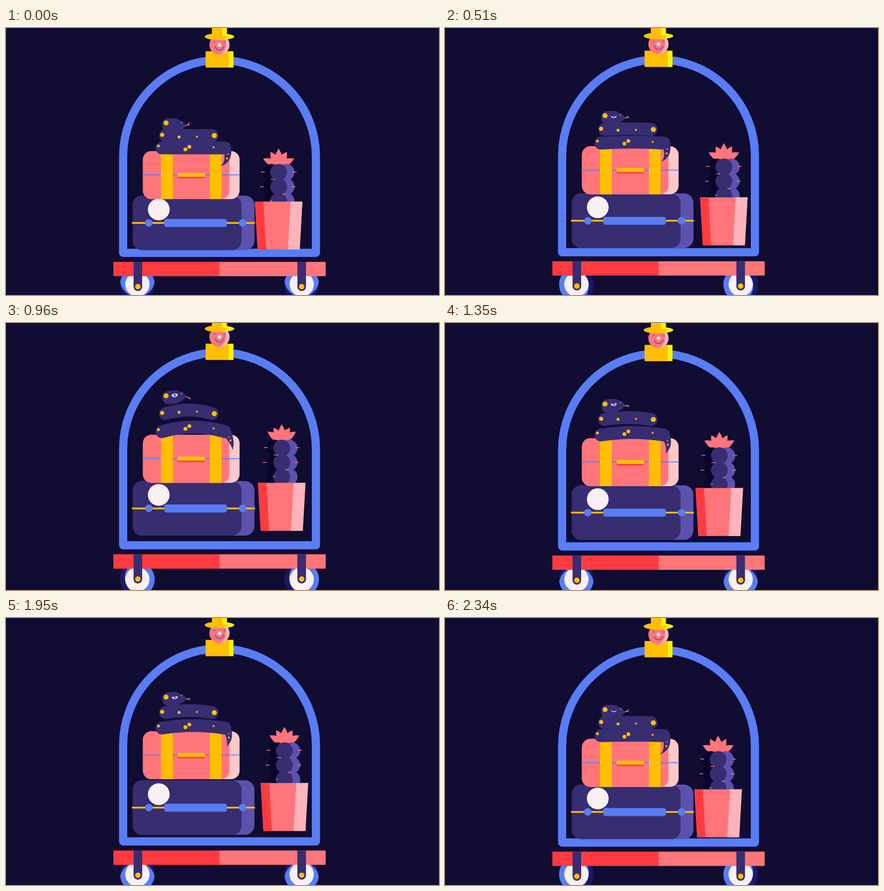
Animation, 875 px wide and 540 px high, one loop 2370 ms. Source, as an HTML page with a canvas:

```html
<!DOCTYPE html>
<html lang="en">
<head>
<meta charset="utf-8">
<title>Luggage cart</title>
<style>
html, body { margin: 0; width: 100%; height: 100%; overflow: hidden; background: #110c32; }
canvas { display: block; }
</style>
</head>
<body>
<canvas id="stage" width="875" height="540"></canvas>
<script>
const ctx = document.getElementById('stage').getContext('2d');
const LOOP = 2370, STEP = 30, BEAT = 600;
const BG = '#110c32', BLUE = '#587df5', NAVY = '#1b1866', INDIGO = '#372d70', VIOLET = '#5c52ae',
  SHADE = '#08062b', RED = '#ff3b40', PINK = '#ff757a', BLUSH = '#ffb4bb', PALE = '#ffc8c9',
  ORANGE = '#ffbf00', YELLOW = '#fff200', WHITE = '#f8f0f3';

const fill = (color, d) => { ctx.fillStyle = color; ctx.fill(new Path2D(d)); };
const line = (color, width, d) => {
  ctx.strokeStyle = color;
  ctx.lineWidth = width;
  ctx.stroke(new Path2D(d));
};
const box = (color, x1, y1, x2, y2, r = 0) => {
  ctx.fillStyle = color;
  ctx.beginPath();
  ctx.roundRect(x1, y1, x2 - x1, y2 - y1, r);
  ctx.fill();
};
const oval = (color, x, y, rx, ry = rx) => {
  ctx.fillStyle = color;
  ctx.beginPath();
  ctx.ellipse(x, y, rx, ry, 0, 0, Math.PI * 2);
  ctx.fill();
};
const group = (x, y, draw) => { ctx.save(); ctx.translate(x, y); draw(); ctx.restore(); };
const clipTo = d => ctx.clip(new Path2D(d));
const turn = (x, y, angle) => {
  ctx.translate(x, y);
  ctx.rotate(angle);
  ctx.translate(-x, -y);
};
const disc = (x, y, r) => `M${x - r} ${y}a${r} ${r} 0 1 1 ${2 * r} 0a${r} ${r} 0 1 1 ${-2 * r} 0`;

// Extra lift of the small case above the large one: [time, pixels]
const HOPS = [[0, 0], [510, 5.3], [960, 3.5], [1350, 5.4], [1590, 9.2], [1950, 9.2], [2340, 2.4], [2400, 0]];
function hop(t) {
  const i = HOPS.findIndex(([time]) => time > t);
  const at = k => HOPS[Math.min(HOPS.length - 1, Math.max(0, k))];
  const slope = k => (at(k + 1)[1] - at(k - 1)[1]) / (at(k + 1)[0] - at(k - 1)[0]);
  const [t0, a] = at(i - 1), [t1, b] = at(i), w = t1 - t0, u = (t - t0) / w, v = 1 - u;
  return a * v * v * (1 + 2 * u) + b * u * u * (3 - 2 * u)
    + w * u * v * (v * slope(i - 1) - u * slope(i));
}

function wheel(x, t) {
  const y = 518.5, a = Math.PI / 2 + t / 300 * Math.PI * 2;
  oval(NAVY, x, y, 35);
  ctx.save();
  clipTo(disc(x, y, 35));
  oval(BLUE, x - 10 * Math.cos(a), y - 10 * Math.sin(a), 35);
  ctx.restore();
  oval(WHITE, x, y, 24.5);
}

function clown() {
  oval(BLUSH, 431.5, 34, 20.3);
  ctx.save();
  clipTo(disc(431.5, 34, 20.3));
  oval(PINK, 419, 32, 26);
  ctx.restore();
  oval(BLUE, 421.5, 28.5, 2);
  oval(BLUE, 441.5, 28.5, 2);
  line('#5a4fa5', 1.6, 'M423 37C424 47.5 439 47.5 440 37');
  oval(WHITE, 431.5, 34, 3.6);
  oval(YELLOW, 431.5, 17.5, 29.8, 6.3);
  oval(ORANGE, 424.5, 17.5, 22.8, 6.3);
  box(YELLOW, 416, -3, 446.5, 16, 4);
  box(ORANGE, 416, -3, 437, 18, 4);
}

function cart() {
  ctx.lineJoin = 'round';
  line(BLUE, 16.6, 'M236.7 454.7V259.5A194.8 194.8 0 0 1 626.3 259.5V454.7Z');
  ctx.lineJoin = 'miter';
  box(RED, 217, 473, 432, 502);
  box(PINK, 431.5, 473, 646, 502);
  for (const x of [266.5, 597.5]) {
    box(INDIGO, x - 8.7, 473, x + 8.7, 532, [0, 0, 8.7, 8.7]);
    oval(ORANGE, x, 523, 5.5);
  }
  box(ORANGE, 403.3, 47, 450.5, 80);
  box(YELLOW, 450, 47, 459.7, 80);
}

function largeCase() {
  box(VIOLET, 256, 339, 502, 449.3, 19);
  box(INDIGO, 256, 339, 476, 449.3, 19);
  box(ORANGE, 254.5, 392.5, 503, 396);
  oval(BLUE, 288.5, 394.2, 7.6);
  oval(BLUE, 478, 394.2, 7.6);
  box(BLUE, 320, 386.3, 446.3, 402.5, 4.5);
  oval(WHITE, 308.7, 367, 22);
}

function smallCase() {
  box(PALE, 276.7, 249, 472, 346, 17);
  box(PINK, 276.7, 249, 451.5, 346, 17);
  box(BLUE, 276.7, 296.3, 472.7, 298);
  box(ORANGE, 313, 249, 337, 346);
  box(ORANGE, 412, 249, 435.7, 346);
  box(RED, 346.5, 295, 401.5, 304, 3);
  box(ORANGE, 346.5, 293, 402.3, 301, 3);
}

// One bent stretch of the body; spots are [x, y, radius]
function coil(x1, x2, y, bend, spots) {
  ctx.lineCap = 'round';
  line(INDIGO, 26, `M${x1} ${y}Q${(x1 + x2) / 2} ${y - 2 * bend} ${x2} ${y}`);
  ctx.lineCap = 'butt';
  for (const [x, sy, r] of spots) {
    const u = Math.min(1, Math.max(0, (x - x1) / (x2 - x1)));
    oval(ORANGE, x, sy - 4 * u * (1 - u) * bend, r);
  }
}

function tail(c) {
  fill(INDIGO, `M455 243Q${458 + 6 * c} ${275 - 14 * c} ${430 + 31 * c} 280
    Q${444 + 11 * c} ${276 - 12 * c} 441 252Z`);
  oval(ORANGE, 446.5 + 8 * c, 264 - 4 * c, 2);
  oval(ORANGE, 448.5 + 2 * c, 255 - 2 * c, 2, 1);
}

function head(c) {
  turn(323, 192, -9 * c * Math.PI / 180);
  const bend = 7 * c - 2.5, y = 198 + bend;
  line(PINK, 1.6, `M356 198Q363 198.5 367.5 ${y}L371 ${y + bend - 2}M367.5 ${y}L371.5 ${y + bend / 2 + 2}`);
  box(INDIGO, 315.5, 182.8, 354, 210, 12);
  oval(INDIGO, 350, 197, 12, 10);
  oval(ORANGE, 323.5, 192, 5);
  oval(WHITE, 354.5, 191.5, 0.9);
  if (c < 0.01) return;
  const lid = 202 - 18 * c ** 0.7;
  ctx.save();
  clipTo(`M334.5 193Q341 202 347.5 193Q341 ${lid} 334.5 193Z`);
  box(WHITE, 333, 183, 349, 202);
  oval(BLUE, 341, 193, 2.4, 4);
  oval(INDIGO, 341, 193, 0.7, 3);
  ctx.restore();
}

function petal(angle, length) {
  ctx.save();
  ctx.rotate(angle * Math.PI / 180);
  fill(PINK, `M0 0C-11 ${-length * 0.3} -8 ${-length * 0.65} 0 ${-length}C8 ${-length * 0.65} 11 ${-length * 0.3} 0 0Z`);
  ctx.restore();
}

function cactus(c) {
  group(551, 278, () => {
    for (const side of [-1, 1]) {
      petal(side * (66 - 11 * c), 34.5);
      petal(side * 31, 32);
    }
    petal(0, 34);
  });
  for (const [color, x] of [[SHADE, 536], [VIOLET, 566], [INDIGO, 551]])
    for (const y of [292, 321, 350]) oval(color, x, y, 17);
  const spines = [[515, 291, 8], [579, 291, 8], [535, 306, 9], [513, 321, 8], [577, 321, 8], [558, 336, 6], [533, 349.5, 5]];
  for (const [x, y, w] of spines) box(PINK, x, y - 0.75, x + w, y + 0.75);
}

function pot() {
  fill(PINK, 'M503 351H599L593.5 448H508.5Z');
  fill(RED, 'M503 351H520L525.5 448H508.5Z');
  fill(BLUSH, 'M575 351H599L593.5 448H569.5Z');
}

function draw(t) {
  const c = (1 - Math.cos(t / BEAT * Math.PI * 2)) / 2;
  const swing = (period, power) => Math.abs(Math.sin(Math.PI * t / period)) ** power;
  const cartY = -5.7 * c, largeY = -21.4 * c, smallY = largeY - hop(t), gap = 12.5 * c;
  const potX = 13 * swing(2 * BEAT, 1.4), potY = -30 * swing(BEAT, 1.6);

  ctx.fillStyle = BG;
  ctx.fillRect(0, 0, 875, 540);
  wheel(265.5, t);
  wheel(597.5, t);
  group(0, cartY, cart);
  group(0, cartY - 0.8 * c, clown);
  group(0, largeY, largeCase);
  group(0, smallY, () => {
    smallCase();
    tail(c);
    coil(315, 442, 242.5, 10 * c,
      [[308, 238.5, 2.8], [362.5, 245.5, 3.8], [370.5, 240.3, 3.8], [419.5, 241.3, 2]]);
  });
  group(0, smallY - gap, () => coil(322.5, 416.5, 217.5, 8 * c,
    [[315.5, 216, 4.2], [349.7, 220.5, 3], [385.7, 219.7, 2], [421, 217.5, 5.2]]));
  group(0, smallY - 2 * gap + c, () => head(c));
  group(potX, potY - gap, () => cactus(c));
  group(potX, potY, pot);
}

function tick() {
  draw(Math.floor(performance.now() % LOOP / STEP) * STEP);
  requestAnimationFrame(tick);
}
tick();
</script>
</body>
</html>
```
